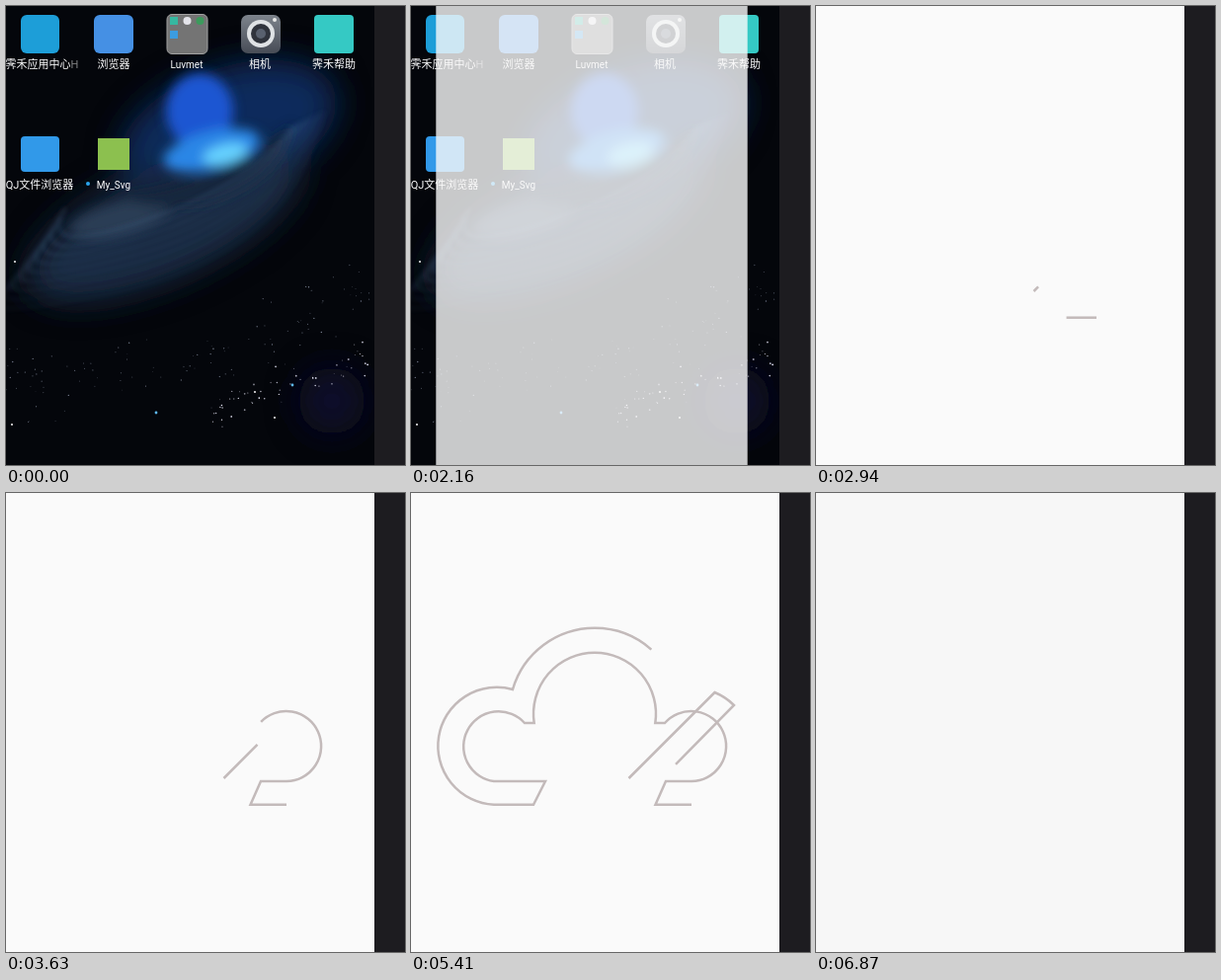
An HTML page that plays this animation: 404 by 465 pixels, repeating every 8270 ms.

```html
<!DOCTYPE html>
<html lang="zh">
<head>
<meta charset="utf-8">
<title>My_Svg</title>
<style>
  html, body { margin: 0; width: 100%; height: 100%; overflow: hidden; background: #1d1c20; }
  svg { display: block; width: 404px; height: 465px; }
  text { fill: #fff; font-family: Roboto, "Noto Sans CJK SC", "Noto Sans CJK", sans-serif; }
  .label { font-size: 11px; text-anchor: middle; }
  .latin { font-size: 10px; }
  .trace { fill: none; stroke: #c3baba; stroke-width: 2.5; }
</style>
</head>
<body>
<svg viewBox="0 0 404 465">
  <defs>
    <clipPath id="screen"><rect width="373" height="465"/></clipPath>
    <filter id="haze" x="-60%" y="-60%" width="220%" height="220%"><feGaussianBlur stdDeviation="16"/></filter>
    <filter id="soft" x="-60%" y="-60%" width="220%" height="220%"><feGaussianBlur stdDeviation="6"/></filter>
    <filter id="fine"><feGaussianBlur stdDeviation="2.5"/></filter>
    <linearGradient id="body" x2="0" y2="1">
      <stop stop-color="#7d838c"/><stop offset="1" stop-color="#474c56"/>
    </linearGradient>
  </defs>
  <rect width="404" height="465" fill="#1d1c20"/>
  <g clip-path="url(#screen)">
    <g id="home">
      <rect width="373" height="465" fill="#04060b"/>
      <g filter="url(#haze)">
        <ellipse cx="225" cy="125" rx="115" ry="62" fill="#0d2a5c" transform="rotate(-20 225 125)"/>
        <ellipse cx="160" cy="220" rx="150" ry="58" fill="#15273d" transform="rotate(-24 160 220)"/>
        <ellipse cx="330" cy="400" rx="34" ry="34" fill="#0b0c2b"/>
      </g>
      <g filter="url(#soft)">
        <ellipse cx="196" cy="106" rx="34" ry="38" fill="#1f56d2"/>
        <ellipse cx="208" cy="146" rx="50" ry="19" fill="#2c86e6" transform="rotate(-14 208 146)"/>
        <ellipse cx="222" cy="150" rx="23" ry="10" fill="#66d2ff" transform="rotate(-14 222 150)"/>
        <ellipse cx="115" cy="215" rx="52" ry="16" fill="#2c3d54" transform="rotate(-14 115 215)"/>
        <path d="M110 192Q215 182 290 120Q280 178 205 200Q150 210 110 192Z" fill="#13253d"/>
      </g>
      <g id="swirl" fill="none" stroke="#5f86b4" stroke-width="3" filter="url(#fine)"></g>
      <g id="stars"></g>

      <rect x="15" y="9" width="39" height="39" rx="6" fill="#1d9ed8"/>
      <rect x="89" y="9" width="40" height="39" rx="6" fill="#4590e4"/>
      <rect x="163" y="8.500" width="41" height="40" rx="5" fill="#747474" stroke="#a2a2a2"/>
      <rect x="166" y="11" width="8" height="8" fill="#36b8a0"/>
      <circle cx="183.500" cy="15" r="4" fill="#e4e4ea"/>
      <circle cx="196.500" cy="15" r="4" fill="#3c9a5c"/>
      <rect x="166" y="25" width="8" height="8" fill="#3c9ce0"/>
      <rect x="238" y="9" width="40" height="39" rx="7" fill="url(#body)"/>
      <circle cx="258" cy="28" r="14" fill="#dfe2e5"/>
      <circle cx="258" cy="28" r="10" fill="#30343d"/>
      <circle cx="258" cy="28" r="5" fill="#59616f"/>
      <circle cx="272" cy="14" r="2" fill="#e8e8e8"/>
      <rect x="312" y="9" width="40" height="39" rx="4" fill="#35c9c4"/>
      <rect x="15" y="132" width="39" height="36" rx="4" fill="#3199e9"/>
      <rect x="93" y="134" width="32" height="32" fill="#8cc04f"/>
      <circle cx="83" cy="180" r="2" fill="#2aa6ee"/>

      <text x="-0.500" y="63" font-size="11">霁禾应用中心<tspan opacity=".5">H</tspan></text>
      <text class="label" x="109" y="63">浏览器</text>
      <text class="label latin" x="183" y="63">Luvmet</text>
      <text class="label" x="257" y="63">相机</text>
      <text class="label" x="332" y="63">霁禾帮助</text>
      <text class="label" x="34" y="185">QJ文件浏览器</text>
      <text class="label latin" x="109" y="185">My_Svg</text>
    </g>

    <g id="splash">
      <rect x="-7" y="-77" width="380" height="652" fill="#fafafa"/>
      <path class="trace" pathLength="1" d="M284 315.700H247.500L258 292H284A35.500 35.500 0 1 0 257 233H247.300A62 62 0 1 0 124.700 233H115A35.500 35.500 0 1 0 84 292H136L124 315.700H84A59.500 59.500 0 1 1 103 199A86.500 86.500 0 0 1 269 199A59.500 59.500 0 1 1 284 315.700Z"/>
      <path class="trace" pathLength="1" d="M220.500 289L307.500 202A59.500 59.500 0 0 1 327 215L254 289Z"/>
    </g>

    <g id="main">
      <rect x="-7" y="-77" width="380" height="652" fill="#f7f7f7"/>
      <rect x="-7" y="-77" width="380" height="46" fill="#000" opacity=".12"/>
      <rect x="-7" y="-77" width="380" height="44" fill="#3f51b5"/>
      <text x="5" y="-50" font-size="17" font-weight="500">My_Svg</text>
    </g>
  </g>
</svg>
<script>
const LOOP = 8270, LAUNCH = 2080, STEP = 77.26, TRACE_START = 2545, TRACE_TIME = 4000;
const MAIN_STEP = 59, MAIN_TIME = 300;
const OPENING = [[.632, .56], [.83, .8], [.947, .94]]; // scale, opacity
const el = id => document.getElementById(id);
const traces = document.querySelectorAll('.trace');

function add(parent, tag, attrs) {
  const node = document.createElementNS('http://www.w3.org/2000/svg', tag);
  for (const name in attrs) node.setAttribute(name, attrs[name]);
  el(parent).append(node);
}

let seed = 17;
const random = () => (seed = seed * 16807 % 2147483647) / 2147483647;
const scatter = size => (random() + random() - 1) * size;

function star(x, y, r, fill, opacity) {
  add('stars', 'circle', { cx: x, cy: y, r, fill, opacity });
}

// Sweeping dust lanes
for (let i = 0; i < 9; i++) {
  add('swirl', 'path', {
    d: `M${290 + i * 4} ${122 - i * 2}Q${250 + i * 5} ${180 + i * 9} ${140 - i * 4} ${218 + i * 9}T${60 - i * 5} ${205 + i * 9}`,
    opacity: .26 - i * .022
  });
}

for (let i = 0; i < 110; i++) {
  const x = random() * 373;
  star(x, 385 - 110 * (x / 373) ** 2 + scatter(45), .4 + random() * .3, '#b9c4dc', .25 + random() * .5);
}
for (let i = 0; i < 60; i++) {
  const x = 205 + random() * 165;
  star(x, 411 - .35 * (x - 200) + scatter(25), .4 + random() * .5, '#eef', .4 + random() * .6);
}
for (const [x, y] of [[252, 391], [6, 424], [272, 417], [9, 259]]) star(x, y, 1.1, '#fff', .9);
for (const [x, y] of [[152, 412], [290, 384]]) star(x, y, 1.4, '#5db8f2', 1);

// Windows grow around the centre of the phone screen
function showWindow(id, scale, opacity) {
  el(id).setAttribute('transform', `translate(183 249) scale(${scale}) translate(-183 -249)`);
  el(id).setAttribute('opacity', opacity);
}

function draw(time) {
  const step = Math.floor((time - LAUNCH + 10) / STEP);
  const [scale, opacity] = step < 0 ? [1, 0] : OPENING[step] || [1, 1];
  showWindow('splash', scale, opacity);

  const now = LAUNCH + step * STEP;
  const t = Math.min(1, Math.max(0, (now - TRACE_START) / TRACE_TIME));
  const drawn = (1 - Math.cos(Math.PI * t)) / 2;
  for (const trace of traces) trace.setAttribute('stroke-dasharray', `${drawn} 2`);

  const entry = Math.min(1, .0275 + (step - MAIN_STEP) * STEP / MAIN_TIME);
  const eased = 1 - (1 - entry) ** 5;
  const entering = step >= MAIN_STEP;
  el('splash').firstElementChild.setAttribute('fill', entering ? '#f7f7f7' : '#fafafa');
  showWindow('main', entering ? .8 + .2 * eased : 1, !entering ? 0 : step >= MAIN_STEP + 3 ? 1 : eased);
}

const origin = performance.now();
function tick() {
  draw((performance.now() - origin) % LOOP);
  requestAnimationFrame(tick);
}
tick();
</script>
</body>
</html>
```
